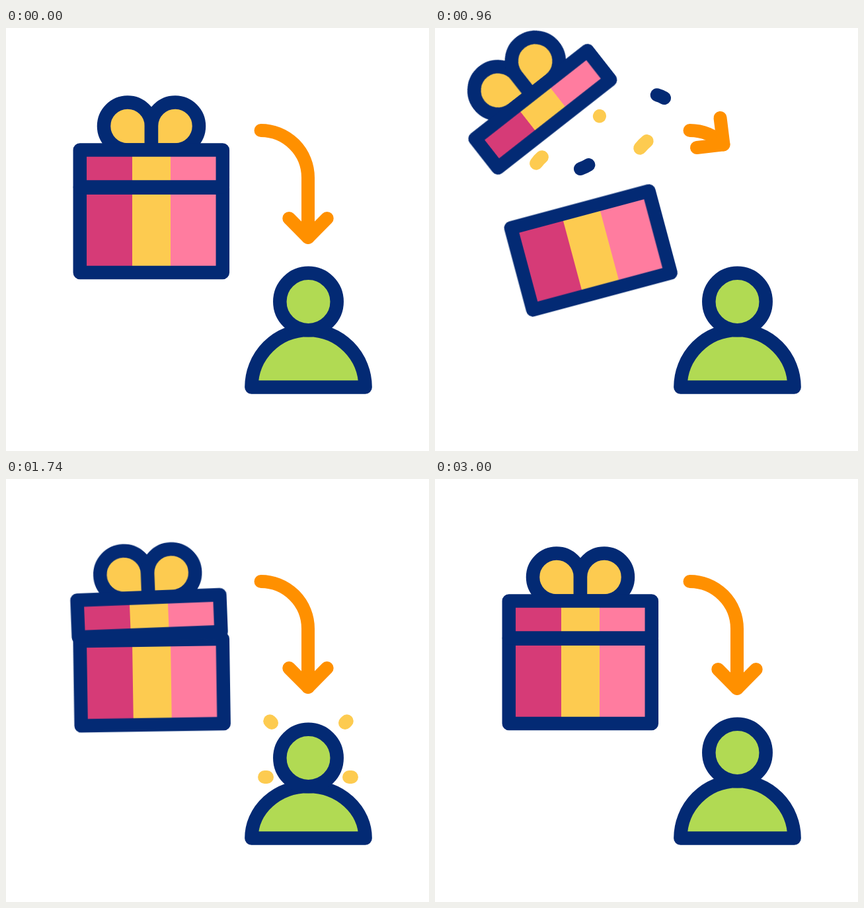
An HTML page without scripts that plays this animation: 640x640 px, repeating every 3220 ms.

```html
<!DOCTYPE html>
<html lang="en">
<head>
<meta charset="utf-8">
<title>Gift delivery</title>
<style>
  /* h: hover amount, w/a/b: hover waves of lid, arrow and box, q: squash */
  @property --h { syntax: "<number>"; inherits: true; initial-value: 0; }
  @property --w { syntax: "<number>"; inherits: true; initial-value: 0; }
  @property --a { syntax: "<number>"; inherits: true; initial-value: 0; }
  @property --b { syntax: "<number>"; inherits: true; initial-value: 0; }
  @property --q { syntax: "<number>"; inherits: true; initial-value: 0; }
  @property --len { syntax: "<number>"; inherits: true; initial-value: 202.6; }
  @property --tilt { syntax: "<number>"; inherits: true; initial-value: 0; }

  html, body { margin: 0; width: 100%; height: 100%; overflow: hidden; background: #fff; }
  svg {
    display: block; width: 100vw; height: 100vh;
    --ease: cubic-bezier(.333, 0, .667, 1);
    animation: hover 3220ms linear infinite, beat 201.25ms linear infinite;
  }
  path, rect, circle { stroke-linecap: round; stroke-linejoin: round; }
  .line { stroke: #032a74; stroke-width: 20.5; }
  .none { fill: none; }
  .crimson { fill: #d63b77; }
  .gold { fill: #fdcb50; }
  .pink { fill: #ff7c9f; }
  .green { fill: #b1da53; }

  @keyframes hover {
    0%, 14.29% { --h: 0; }
    16.77%, 40.99% { --h: 1; }
    44.1%, 100% { --h: 0; }
  }
  @keyframes beat {
    0%, 100% { --w: .95; --a: .65; --b: 5; }
    20% { --w: 1.12; --a: 1.08; --b: -1; }
    46% { --w: 1; --a: 1; --b: -5.5; }
    72% { --w: 0; --a: 0; --b: -2; }
    77% { --w: 0; --a: 0; --b: 0; }
    88.2% { --w: .55; --a: .3; --b: 5.5; }
  }

  /* gift */
  .open { animation: open 3220ms var(--ease) infinite; }
  .box { --to: translate(16px, 30.3px) rotate(-15deg); transform-origin: 220px 306px; }
  .lid { --to: translate(-56.9px, -90px) rotate(-38.1deg); transform-origin: 220px 212.5px; }
  .box-float { transform: translateY(calc(var(--h) * var(--b) * 1px)); }
  .lid-float { transform: translateY(calc(var(--h) * var(--w) * 12.75px)); }
  .loop { transform-origin: 220px 184px; }
  .left { transform: rotate(calc(var(--h) * var(--w) * 5deg)); }
  .right { transform: rotate(calc(var(--h) * var(--w) * -5deg)); }
  @keyframes open {
    0%, 6.832% { transform: translate(0, 0) rotate(0deg); }
    16.77%, 41.61% { transform: var(--to); }
    56.2%, 100% { transform: translate(0, 0) rotate(0deg); }
  }

  /* confetti: two dashes run along each wavy path */
  .confetti path { fill: none; stroke-width: 20; animation: fly 3220ms linear infinite; }
  @keyframes fly {
    0%, 15.53% { stroke-dashoffset: var(--from); }
    44.1%, 100% { stroke-dashoffset: var(--end); }
  }

  /* arrow */
  .arrow {
    fill: none; stroke: #ff9000; stroke-width: 20;
    --s: calc(var(--len) * 1px + var(--h) * var(--a) * 14.5px);
    animation: arrow 3220ms var(--ease) infinite;
  }
  .stem { stroke-dasharray: var(--s) 999px; }
  .head {
    offset-path: path("M385.5 155A71.5 71.5 0 0 1 457 226.5V340");
    offset-distance: var(--s);
    offset-rotate: auto;
  }
  .tip { transform: rotate(calc(var(--tilt) * 1deg + var(--h) * var(--a) * 3.3deg)); }
  @keyframes arrow {
    0%, 6.832% { --len: 202.6; --tilt: 0; }
    16.77%, 41.61% { --len: 56.5; --tilt: -7.3; }
    54.97%, 55.9% { --len: 202.6; --tilt: 0; }
    69.57%, 75.16% { --len: 189.6; --tilt: 0; }
    93.17%, 100% { --len: 202.6; --tilt: 0; }
  }

  /* person */
  .person { animation: squash 3220ms var(--ease) infinite; }
  .face { transform: translateY(calc(var(--q) * 1px)); }
  .torso {
    vector-effect: non-scaling-stroke;
    transform-origin: 457.5px 543.5px;
    transform: scaleY(calc(1 - var(--q) / 86.5));
  }
  @keyframes squash {
    0%, 50.93% { --q: 0; }
    54.66% { --q: 8.6; }
    68.32%, 100% { --q: 0; }
  }
  .sparks path {
    fill: none; stroke: #fdcb50; stroke-width: 20; stroke-dasharray: 14 999;
    animation: spark 3220ms infinite;
  }
  @keyframes spark {
    0%, 53.26% { stroke-dashoffset: 14.5; animation-timing-function: cubic-bezier(.3, .48, .6, 1); }
    69.57%, 100% { stroke-dashoffset: -41; }
  }
</style>
</head>
<body>
<svg viewBox="0 0 640 640">
  <g class="box-float"><g class="open box">
    <rect class="crimson" x="112" y="242" width="79" height="128"/>
    <rect class="pink" x="249" y="242" width="79" height="128"/>
    <rect class="gold" x="191" y="242" width="58" height="128"/>
    <rect class="line none" x="111.8" y="241.8" width="216" height="128.2"/>
  </g></g>

  <g class="confetti">
    <path d="M153 205C175 172 239 176 249 133" stroke="#fdcb50" stroke-dasharray="13 110 13 9999" style="--from:141.5px;--end:-141.5px"/>
    <path d="M220 213C274 195 258 115 302 104C320 97 335 99 347 106" stroke="#032a74" stroke-dasharray="16 163 16 9999" style="--from:205.5px;--end:-200px"/>
    <path d="M310 182C334 150 383 155 398 117" stroke="#fdcb50" stroke-dasharray="15 114 15 9999" style="--from:145.2px;--end:-145.2px"/>
  </g>

  <g class="lid-float"><g class="open lid">
    <path class="line gold loop left" d="M220 184.4V148a36 36 0 1 0-36 36.4z"/>
    <path class="line gold loop right" d="M220 184.4V148a36 36 0 1 1 36 36.4z"/>
    <rect class="crimson" x="112" y="185" width="79" height="55"/>
    <rect class="pink" x="249" y="185" width="79" height="55"/>
    <rect class="gold" x="191" y="185" width="58" height="55"/>
    <rect class="line none" x="111.8" y="184.4" width="216" height="56.1"/>
  </g></g>

  <g class="arrow">
    <path class="stem" d="M385.5 155A71.5 71.5 0 0 1 457 226.5V340"/>
    <g class="head"><path class="tip" d="M-29 -28.7L0 0L-29 28.7"/></g>
  </g>

  <g class="sparks">
    <path d="M402 369L374 341"/>
    <path d="M513 369L541 341"/>
    <path d="M395 451H357"/>
    <path d="M519 451H557"/>
  </g>

  <g class="person">
    <path class="line green torso" d="M371.4 543.5a86.1 86.5 0 0 1 172.2 0z"/>
    <circle class="line green face" cx="457.5" cy="414" r="43.2"/>
  </g>
</svg>
</body>
</html>
```
